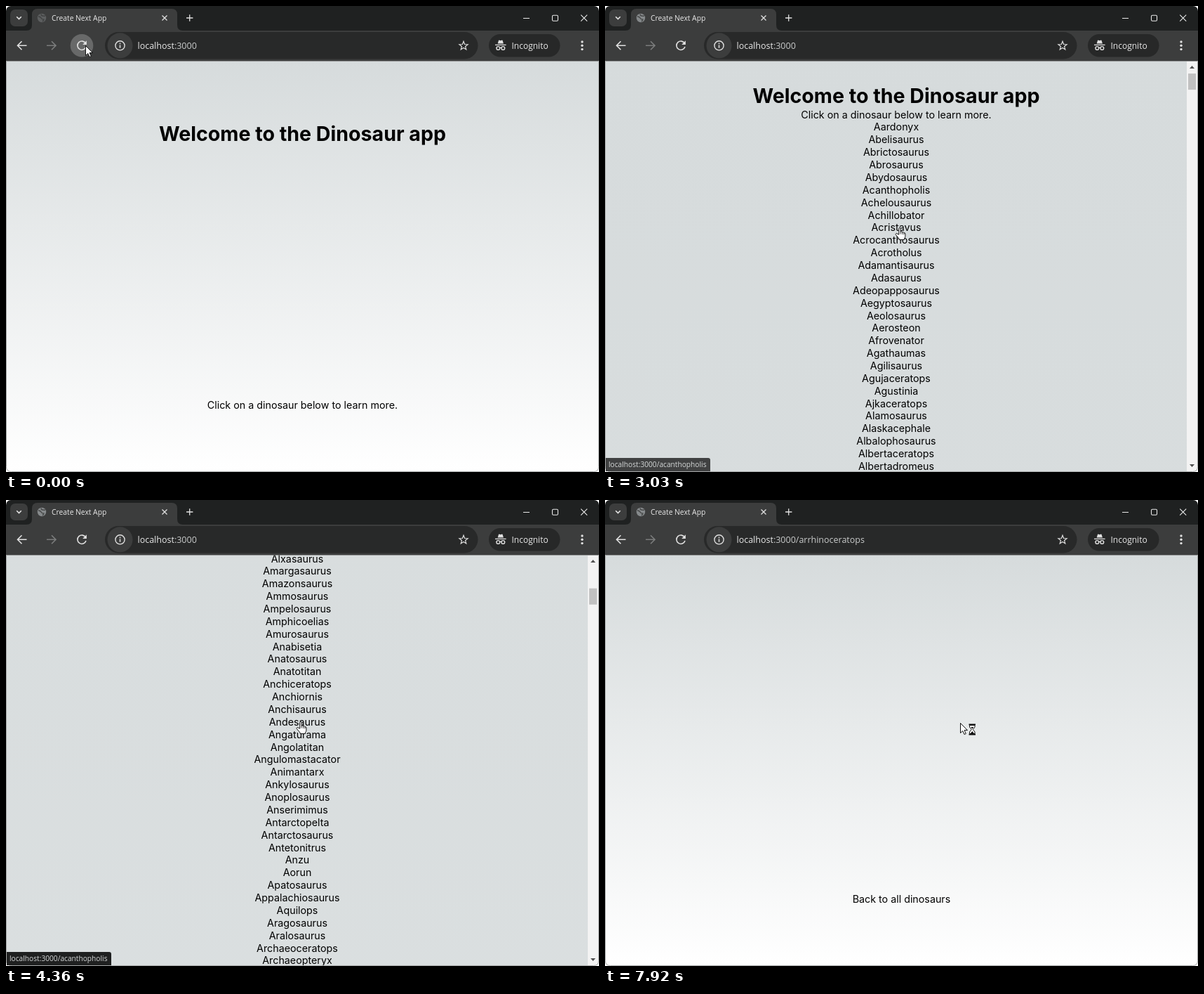
An HTML page for the animation above (8000 ms loop, 845 px wide and 663 px high).

```html
<!DOCTYPE html>
<html lang="en">
<head>
<meta charset="utf-8">
<title>Dinosaur app</title>
<style>
  html, body { margin: 0; width: 100%; height: 100%; overflow: hidden; background: #fff; }
  svg { position: absolute; left: 0; top: 0; display: block; }
  text { white-space: pre; }
  .page text { font: 14.29px Inter, sans-serif; text-anchor: middle; fill: #000; }
  .page .title { font-size: 28.59px; font-weight: 700; }
  .ui text { font: 12.5px "Open Sans", sans-serif; fill: #e8e8e8; }
  .line { fill: none; stroke: #e0e0e0; stroke-width: 1.6; }
  .thin { fill: none; stroke: #e8e8e8; stroke-width: 1.1; }
  #status {
    position: absolute; left: 1px; top: 643px; height: 19px; box-sizing: border-box;
    padding: 0 5px 0 4px; overflow: hidden; white-space: nowrap;
    font: 10.2px/19px "Open Sans", sans-serif; color: #d6d8d8;
    background: #1f2020; border-radius: 0 3px 0 0;
  }
</style>
</head>
<body>
<svg width="845" height="663" viewBox="0 0 845 663">
  <defs>
    <linearGradient id="fade" x1="0" y1="0" x2="0" y2="1">
      <stop offset="0" stop-color="#d6dbdc"/>
      <stop offset="1" stop-color="#fff"/>
    </linearGradient>
    <clipPath id="window"><rect width="845" height="663" rx="7"/></clipPath>
    <clipPath id="view"><rect x="1" y="78.5" width="843" height="583.5"/></clipPath>
  </defs>

  <g clip-path="url(#window)">
    <g class="page" clip-path="url(#view)">
      <g id="short">
        <rect x="1" y="78" width="843" height="585" fill="url(#fade)"/>
        <text id="shortTitle" class="title" x="422.5" y="192.2">Welcome to the Dinosaur app</text>
        <text id="shortLine" x="422.5" y="572.8"></text>
      </g>
      <g id="long">
        <g id="scroller">
          <rect id="longBack" x="1" y="78" width="843" fill="url(#fade)"/>
          <text class="title" x="415" y="192.2">Welcome to the Dinosaur app</text>
          <text x="415" y="213.6">Click on a dinosaur below to learn more.</text>
          <g id="names"></g>
        </g>
        <rect x="829" y="78" width="15" height="585" fill="#f3f3f3"/>
        <rect id="thumb" x="831" y="94" width="11" height="23" fill="#c1c1c1"/>
        <path id="up" d="M833 89h7l-3.5-4z"/>
        <path d="M833 652h7l-3.5 4z" fill="#505050"/>
      </g>
    </g>

    <g class="ui">
      <rect width="845" height="36" fill="#1f2121"/>
      <rect y="35" width="845" height="43.5" fill="#3c3d3d"/>
      <rect x="6" y="5" width="25" height="24" rx="7" fill="#3c3d3d"/>
      <path class="line" d="M15.2 15.2l3.3 3.3 3.3-3.3"/>
      <path d="M29 35q8 0 8-8V12q0-8 8-8h191q8 0 8 8v15q0 8 8 8z" fill="#3c3d3d"/>
      <g id="globe">
        <circle cx="51" cy="17" r="6.2" fill="#85898b"/>
        <path d="M46 15q3 0 4 2t3 2-1 3M50 11.500q0 2 2 2.500t4 0" fill="none" stroke="#484a4a" stroke-width="1.6"/>
      </g>
      <text x="65" y="21.2" style="font-size:10.3px">Create Next App</text>
      <path class="line" style="stroke-width:1.3" d="M222.500 13.500l7 7m0-7l-7 7M257 17h9.400m-4.700-4.700v9.400"/>
      <path class="thin" d="M737 17.500h9M819.200 12.700l9 9m0-9l-9 9"/>
      <rect class="thin" x="778.500" y="13.200" width="8" height="8" rx="1.500"/>

      <path class="line" d="M29.500 56.300H16.500m6-6l-6 6 6 6"/>
      <path class="line" style="stroke:#7b7c7c" d="M58 56.300h13m-6-6l6 6-6 6"/>
      <circle id="hover" cx="108" cy="56.300" r="16.300" fill="#686969"/>
      <path class="line" d="M113.600 53.400a6.200 6.200 0 1 0 .4 4.600"/>
      <path d="M114.900 49.300v5.700h-5.700z" fill="#e0e0e0"/>

      <rect x="141" y="37" width="531.500" height="38.500" rx="19.250" fill="#282929"/>
      <circle cx="162.500" cy="56.300" r="18" fill="#3c3d3d"/>
      <circle class="line" style="stroke-width:1.4" cx="162.500" cy="56.300" r="6.600"/>
      <path class="line" style="stroke-width:1.5" d="M162.500 55.500v4.300m0-7.200v1.600"/>
      <text x="187.500" y="60.700">localhost<tspan id="path" fill="#c9cbcb"></tspan></text>
      <path id="star" class="line" style="stroke-width:1.2"/>

      <rect x="688" y="40" width="101.500" height="32.500" rx="16.250" fill="#272828"/>
      <path d="M700.700 53.500l1.200-4.200q.4-1 1.500-.6l1.400.5 1.400-.5q1.100-.4 1.500.6l1.200 4.200z" fill="#e0e0e0"/>
      <path class="line" style="stroke-width:1.3" d="M697 55.300h15.600M703.600 59.500q1.200-.8 2.400 0"/>
      <circle class="line" style="stroke-width:1.4" cx="701.300" cy="60" r="2.400"/>
      <circle class="line" style="stroke-width:1.4" cx="708.300" cy="60" r="2.400"/>
      <text x="720.500" y="60.800" style="font-size:12px">Incognito</text>
      <g fill="#e0e0e0">
        <circle cx="821" cy="51" r="1.700"/><circle cx="821" cy="56.300" r="1.700"/><circle cx="821" cy="61.600" r="1.700"/>
      </g>
    </g>
  </g>
  <path d="M.5 78V655.500q0 7 7 7h830q7 0 7-7V78" fill="none" stroke="#a3a5a5"/>
</svg>

<div id="status"></div>

<svg width="845" height="663" viewBox="0 0 845 663">
  <g id="cursor" stroke="#111" stroke-linejoin="round">
    <path id="arrow" d="M.5 .5V14.500l3.300-3 2.200 5 2.300-1-2.200-4.900h4.400z" fill="#fff"/>
    <g id="hand">
      <path d="M-1.200 10.200V1.700q0-1.300 1.200-1.300t1.200 1.300v4.500q2.100-.8 2.500.6 1.900-.5 2.200.9 2-.3 2 1.500v3.300q0 2-1.500 3.400v1.600h-7.200v-1.300l-4.800-5.700q-.7-1.200.4-1.800 1.100-.5 2.200.6z" fill="#fff"/>
      <path d="M1.200 6v3.600M3.700 7v3M5.900 8v2.400" fill="none" stroke-width=".8"/>
    </g>
    <g id="glass">
      <path d="M12.500 2.500h9.500M12.500 16.500h9.500" stroke-width="2"/>
      <path d="M13.500 3.500v2.500l2.700 3.500-2.700 3.500v2.500h7.500v-2.500l-2.700-3.500 2.700-3.500v-2.500z" fill="#fff"/>
      <path d="M15.300 6h4l-2 2.700zM14.800 15l2.500-3 2.500 3z" fill="#111" stroke="none"/>
    </g>
  </g>
</svg>

<script>
const LOOP = 8000;
const SCALE = 0.8935;      // page zoom
const ROW = 20 * SCALE;
const VIEW = 583, DOC = 14070;
const $ = id => document.getElementById(id);

const names = `Aardonyx Abelisaurus Abrictosaurus Abrosaurus Abydosaurus Acanthopholis
Achelousaurus Achillobator Acristavus Acrocanthosaurus Acrotholus Adamantisaurus Adasaurus
Adeopapposaurus Aegyptosaurus Aeolosaurus Aerosteon Afrovenator Agathaumas Agilisaurus
Agujaceratops Agustinia Ajkaceratops Alamosaurus Alaskacephale Albalophosaurus Albertaceratops
Albertadromeus Albertonykus Albertosaurus Alectrosaurus Aletopelta Alioramus Allosaurus
Altirhinus Alvarezsaurus Alwalkeria Alxasaurus Amargasaurus Amazonsaurus Ammosaurus Ampelosaurus
Amphicoelias Amurosaurus Anabisetia Anatosaurus Anatotitan Anchiceratops Anchiornis Anchisaurus
Andesaurus Angaturama Angolatitan Angulomastacator Animantarx Ankylosaurus Anoplosaurus
Anserimimus Antarctopelta Antarctosaurus Antetonitrus Anzu Aorun Apatosaurus Appalachiosaurus
Aquilops Aragosaurus Aralosaurus Archaeoceratops Archaeopteryx Archaeornithomimus Arcovenator
Arcusaurus Argentinosaurus Argyrosaurus Aristosuchus Arrhinoceratops Astrodon Asylosaurus
Atlasaurus Atlascopcosaurus Atrociraptor Aublysodon Aucasaurus Auroraceratops Australodocus
Australovenator Austroraptor Austrosaurus Avaceratops`.split(/\s+/);

names.forEach((name, i) => {
  const row = document.createElementNS("http://www.w3.org/2000/svg", "text");
  row.setAttribute("x", 415);
  row.setAttribute("y", 231.5 + i * ROW);
  row.textContent = name;
  $("names").append(row);
});
$("longBack").setAttribute("height", DOC);

const starPoints = Array.from({ length: 10 }, (_, i) => {
  const r = i % 2 ? 2.7 : 6.4, a = i * Math.PI / 5;
  return `${652 + r * Math.sin(a)} ${56.7 - r * Math.cos(a)}`;
});
$("star").setAttribute("d", `M${starPoints.join("L")}z`);

// Each key is [time, ...values]
const cursorKeys = [
  [90, 113, 56], [690, -20, 168], [1800, -20, 172], [1910, 12, 178], [2620, 405, 264],
  [2830, 420, 315], [4660, 420, 315], [4760, 421, 331], [5070, 421, 331], [5370, 418, 408],
  [5480, 418, 408], [5580, 416, 410], [5690, 417, 411], [5780, 417, 411], [5880, 420, 411],
  [5990, 418, 411], [7000, 418, 411], [7090, 428, 341], [7520, 428, 341], [7900, 506, 317]
];
const scrollKeys = [
  [2940, 0], [3033, 60], [3535, 500], [3650, 500], [3744, 530], [3845, 583],
  [4350, 900], [4560, 900], [5060, 1300]
];
const statusKeys = [
  [0, ""], [3030, "acanthopholis"], [5370, "argyrosaurus"], [5570, "arrhinoceratops"],
  [7090, "argentinosaurus"], [7600, ""]
];

function tween(keys, t) {
  const i = keys.findIndex(k => k[0] > t);
  if (i < 0) return keys[keys.length - 1].slice(1);
  if (i === 0) return keys[0].slice(1);
  const a = keys[i - 1], b = keys[i], p = (t - a[0]) / (b[0] - a[0]);
  return a.slice(1).map((v, j) => v + (b[j + 1] - v) * p);
}

const show = (id, on) => { $(id).style.display = on ? "" : "none"; };

// The screen refreshes about ten times a second
const snap = t => 90 + 101.5 * Math.floor((t - 82) / 101.5);

function draw(time) {
  const t = snap(time);
  const reloading = t < 590, leaving = t >= 7190;

  show("short", reloading || leaving);
  show("long", !reloading && !leaving);
  show("shortTitle", reloading);
  $("shortLine").textContent = leaving
    ? "Back to all dinosaurs" : "Click on a dinosaur below to learn more.";
  $("path").textContent = leaving ? ":3000/arrhinoceratops" : ":3000";
  $("globe").setAttribute("opacity", t < 400 ? 0.45 : 1);
  show("hover", t < 290);

  const scroll = tween(scrollKeys, t)[0] * SCALE;
  $("scroller").setAttribute("transform", `translate(0 ${-scroll})`);
  $("thumb").setAttribute("y", 94 + scroll / (DOC - VIEW) * 532);
  $("up").setAttribute("fill", scroll > 0 ? "#505050" : "#a3a3a3");

  const link = statusKeys.filter(k => k[0] <= t).pop()?.[1];
  const status = $("status");
  show("status", link);
  status.textContent = "localhost:3000/" + link;
  status.style.opacity = t < 3100 ? 0.82 : 1;
  status.style.maxWidth = t >= 7090 && t < 7190 ? "134px" : "none";

  const [x, y] = tween(cursorKeys, t);
  const pointing = t >= 2600 && t < 7600;
  $("cursor").setAttribute("transform", `translate(${Math.round(x)} ${Math.round(y)})`);
  show("hand", pointing);
  show("arrow", !pointing);
  show("glass", t >= 7600);
}

const start = performance.now();
function tick() {
  draw((performance.now() - start) % LOOP);
  requestAnimationFrame(tick);
}
tick();
</script>
</body>
</html>
```
